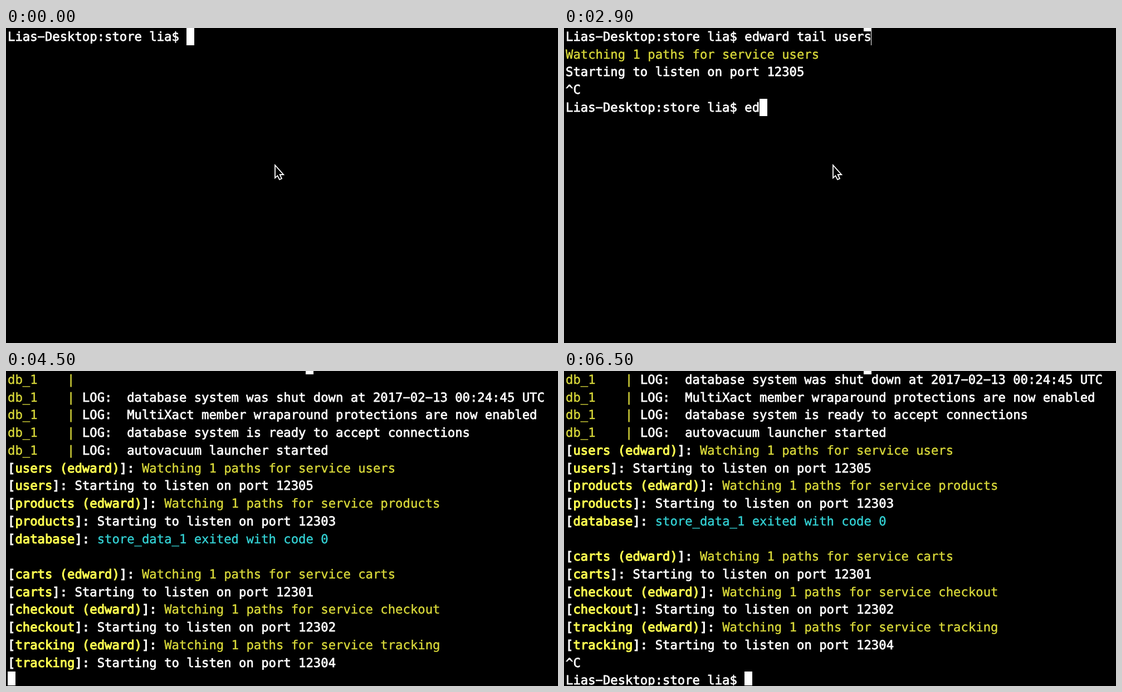
An HTML page for the animation above (7000 ms loop, 991 px wide and 565 px high).

```html
<!DOCTYPE html>
<html lang="en">
<head>
<meta charset="utf-8">
<title>Terminal session</title>
<style>
  html, body { margin: 0; width: 100%; height: 100%; overflow: hidden; background: #000; }
  #stage { position: relative; width: 991px; height: 564px; overflow: hidden; background: #000; }
  #stage > * { position: absolute; }
  #screen {
    inset: 1px 0 0;
    color: #fff;
    font: 22.24px/31.73px "DejaVu Sans Mono", monospace;
    text-rendering: geometricPrecision;
    font-variant-ligatures: none;
    -webkit-text-stroke: .75px currentColor;
  }
  #screen div { position: absolute; left: 3px; white-space: pre; }
  .y { color: #dada3a; -webkit-text-stroke-width: .4px; }
  .c { color: #34d3d6; -webkit-text-stroke-width: .4px; }
  .h { color: #ffff50; }
  .tag { -webkit-text-stroke-width: 1.1px; }
  #cursor { width: 14px; height: 31px; background: #fff; }
  #smear, #edge { background: #fff; top: 0; }
  #smear { left: 538px; width: 14px; height: 6px; }
  #edge { left: 550.5px; width: 1.5px; height: 31px; }
  #mouse { left: 0; top: 0; }
</style>
</head>
<body>
<div id="stage">
  <div id="screen"></div>
  <div id="cursor"></div>
  <div id="smear"></div>
  <div id="edge"></div>
  <svg id="mouse" width="991" height="564">
    <path d="M483 246V269L487.4 264.9L491 271.8L495 270L491.7 263H498.2Z" stroke="#fff" stroke-width="1.8"/>
  </svg>
</div>
<script>
const LOOP = 7000, COL = 13.39, ROW = 31.73, LEFT = 3;
const PROMPT = 'Lias−Desktop:store lia$ ';
const $ = id => document.getElementById(id);
const paint = (cls, text) => `<span class="${cls}">${text}</span>`;

const watching = name => paint('y', `Watching 1 paths for service ${name}`);
const listening = port => `Starting to listen on port ${port}`;
const tag = name => paint('tag', `[${paint('h', name)}]: `);
const db = text => paint('y', 'db_1    |') + text;
const service = (name, port) => [
  tag(`${name} (edward)`) + watching(name),
  tag(name) + listening(port)
];

const log = [
  db(''),
  db(' LOG:  database system was shut down at 2017−02−13 00:24:45 UTC'),
  db(' LOG:  MultiXact member wraparound protections are now enabled'),
  db(' LOG:  database system is ready to accept connections'),
  db(' LOG:  autovacuum launcher started'),
  ...service('users', 12305),
  ...service('products', 12303),
  tag('database') + paint('c', 'store_data_1 exited with code 0'),
  '',
  ...service('carts', 12301),
  ...service('checkout', 12302),
  ...service('tracking', 12304)
];

// Characters typed at time t, from [time, count] points
function typed(t, points) {
  if (t < points[0][0]) return 0;
  for (let i = 1; i < points.length; i++) {
    const [t0, n0] = points[i - 1], [t1, n1] = points[i];
    if (t < t1) return Math.round(n0 + (n1 - n0) * (t - t0) / (t1 - t0));
  }
  return points[points.length - 1][1];
}

const first = t => PROMPT + 'edward tail users'.slice(0, typed(t, [[300, 1], [1000, 13], [1400, 17]]));
const second = t => PROMPT + 'edward tail store'.slice(0, typed(t, [[2800, 1], [3500, 11], [4100, 17]]));

// Rows on screen plus the column of the cursor on the last row
function terminal(t) {
  if (t < 1500) return { rows: [first(t)], col: first(t).length };
  if (t < 4400) {
    const rows = [first(t), watching('users'), listening(12305)];
    if (t < 2500) return { rows: [...rows, ''], col: 0 };
    if (t < 2600) return { rows: [...rows, '^C'], col: 2 };
    return { rows: [...rows, '^C', second(t)], col: second(t).length };
  }
  if (t < 6300) return { rows: [...log, ''], col: 0 };
  if (t < 6400) return { rows: [...log, '^C'], col: 2 };
  return { rows: [...log.slice(1), '^C', PROMPT], col: PROMPT.length };
}

// The cursor blinks only while a command is running
function cursorOn(t) {
  const waiting = (t >= 1500 && t < 2500) || (t >= 4400 && t < 6300);
  return !waiting || (t + 800) % 1000 < 500;
}

const show = (id, on) => { $(id).style.visibility = on ? 'visible' : 'hidden'; };
let last = -1;

function frame(now) {
  const t = Math.floor(now % LOOP / 100) * 100;
  if (t !== last) {
    last = t;
    const { rows, col } = terminal(t);
    $('screen').innerHTML = rows
      .map((row, i) => `<div style="top:${(i * ROW).toFixed(2)}px">${row}</div>`).join('');
    $('cursor').style.left = Math.round(LEFT + col * COL) + 'px';
    $('cursor').style.top = Math.round((rows.length - 1) * ROW) + 'px';
    show('cursor', cursorOn(t));
    show('smear', t >= 1400);
    show('edge', t >= 1400 && t < 4400);
    show('mouse', t < 4400);
  }
  requestAnimationFrame(frame);
}
frame(performance.now());
</script>
</body>
</html>
```
